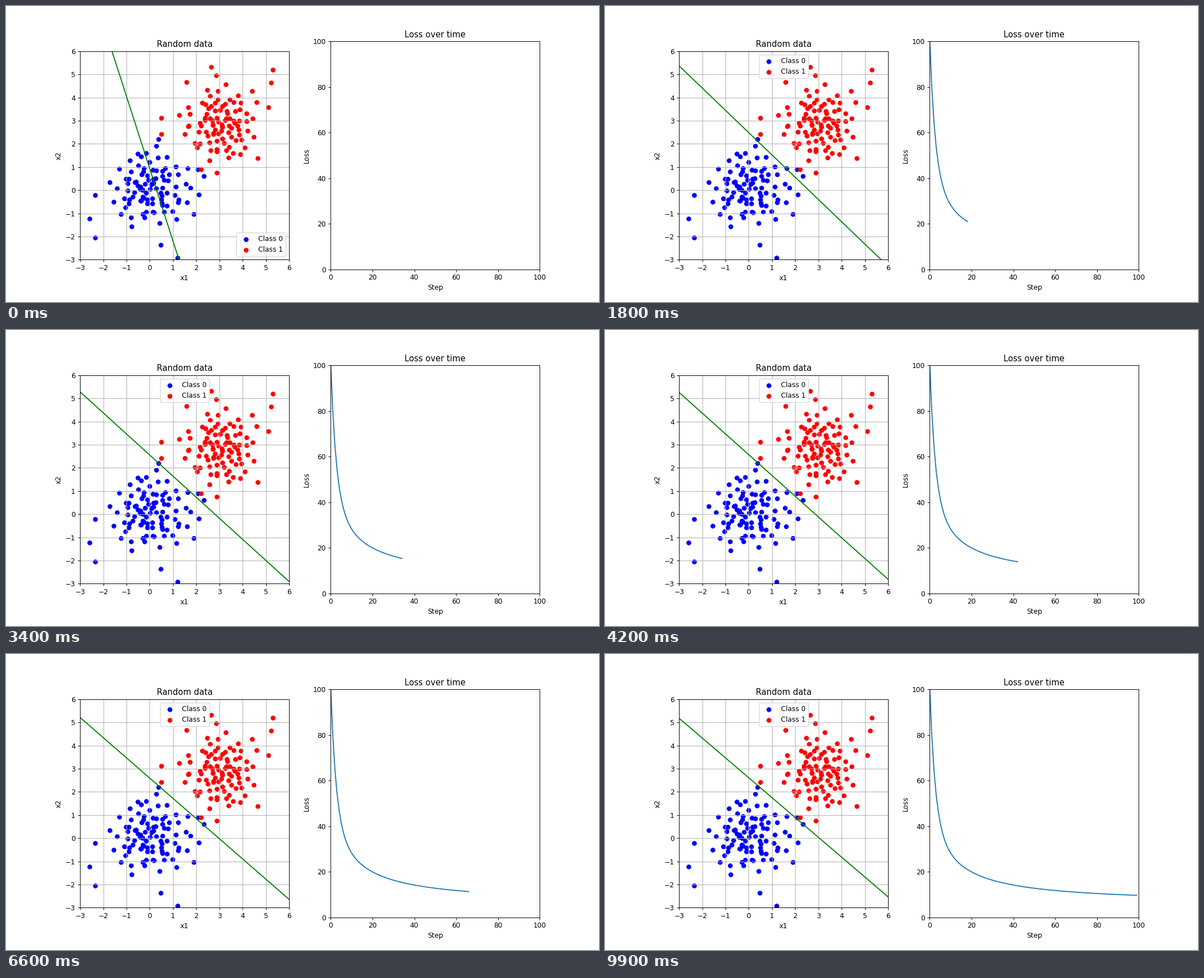
A matplotlib script that plays this animation: 1058 by 529 pixels, repeating every 10 s.

```python
import numpy as np
import matplotlib.pyplot as plt
from matplotlib.animation import FuncAnimation

STEPS = 100
LO, HI = -3, 6
rng = np.random.default_rng(4)

# A few far points of each class; cloud() fills in the rest.
FAR_0 = [(-2.6, -1.23), (-2.36, -0.21), (-2.36, -2.04), (0.47, -2.36),
         (1.2, -2.92), (1.9, -1.04), (2.11, -0.19), (2.33, 0.6),
         (2.06, 0.9), (0.37, 2.2)]
FAR_1 = [(0.5, 3.12), (0.5, 2.43), (1.58, 4.67), (2.65, 5.33),
         (2.86, 4.95), (4.4, 4.29), (5.24, 4.65), (5.29, 5.2),
         (5.1, 3.59), (4.65, 1.39), (2.88, 0.75), (2.2, 0.9)]


def cloud(far, center, spread, n=100):
    """Bell-shaped golden-angle spiral with jitter, plus the far points."""
    i = np.arange(n - len(far))
    angle = i * np.pi * (3 - np.sqrt(5))
    r = spread * np.sqrt(-2 * np.log(1 - (i + 0.5) / n))
    spiral = np.column_stack([r * np.cos(angle), r * np.sin(angle)])
    jitter = rng.normal(0, 0.1, spiral.shape)
    return np.vstack([far, center + spiral + jitter])


def loss(t):
    return 6 + 400 / (t + 8.67) + 47.9 * np.exp(-0.41 * t)


def boundary(t):
    """Slope and intercept of the decision line after t steps."""
    fast = np.exp(-0.38 * t)
    slope = -(0.82 + 3.96 / (t + 10.5) + 1.92 * fast)
    intercept = 2.64 - 3.18 / (t + 2.5) - 0.44 * fast
    return slope, intercept


fig, (ax_data, ax_loss) = plt.subplots(1, 2, figsize=(12, 6), dpi=1058 / 12)

class_0 = cloud(FAR_0, (0, 0.08), 0.88)
class_1 = cloud(FAR_1, (3.0, 2.85), 0.86)
ax_data.scatter(*class_0.T, color="blue", label="Class 0")
ax_data.scatter(*class_1.T, color="red", label="Class 1")
ax_data.set(title="Random data", xlabel="x1", ylabel="x2",
            xlim=(LO, HI), ylim=(LO, HI), aspect="equal",
            xticks=range(LO, HI + 1), yticks=range(LO, HI + 1))
ax_data.grid(True)
line, = ax_data.plot([], [], color="green")

ax_loss.set(title="Loss over time", xlabel="Step", ylabel="Loss",
            xlim=(0, 100), ylim=(0, 100))
curve, = ax_loss.plot([], [])
span = np.array([LO, HI])


def draw(t):
    slope, intercept = boundary(t)
    line.set_data(span, slope * span + intercept)
    steps = np.arange(t + 1)
    curve.set_data(steps, loss(steps))
    # The legend moves away once the line reaches its corner.
    x_low = (-2.83 - intercept) / slope
    ax_data.legend(loc="upper center" if x_low > 3.73 else "lower right")
    return line, curve


anim = FuncAnimation(fig, draw, frames=STEPS, interval=100,
                     repeat=True, repeat_delay=0, blit=False)
plt.show()
```
